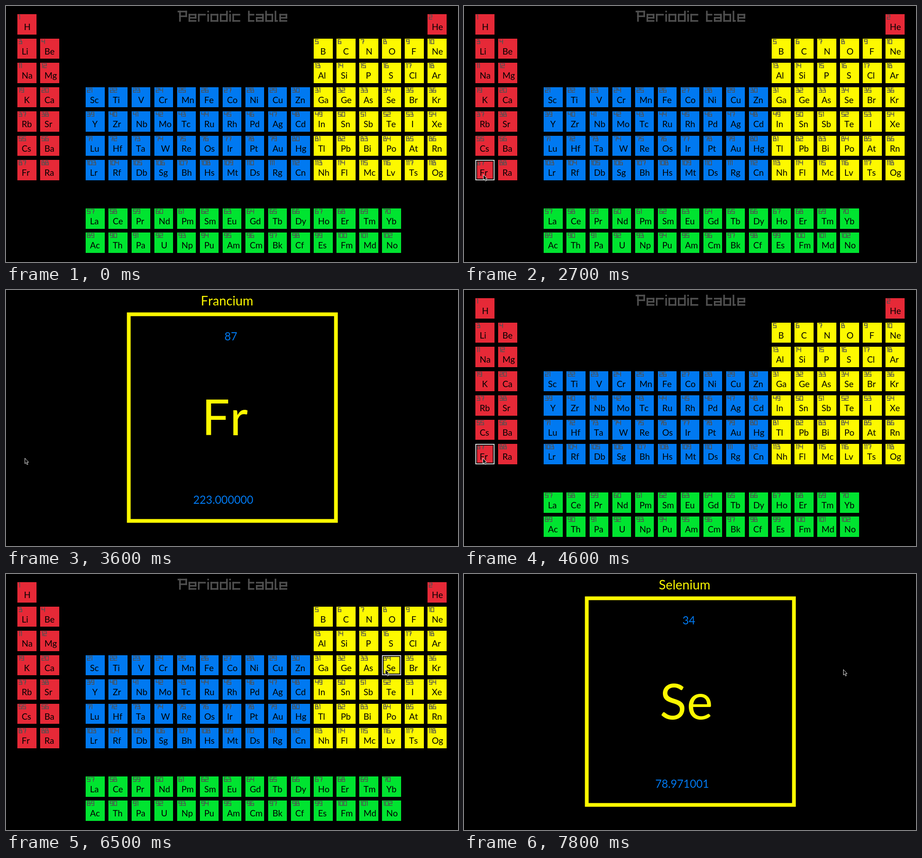
Write an HTML page with a canvas that moves like this. It is 993 by 564 pixels and loops after 8 s.

```html
<!DOCTYPE html>
<html lang="en">
<head>
<meta charset="utf-8">
<title>Periodic table</title>
<style>
html, body { margin: 0; width: 100%; height: 100%; overflow: hidden; background: #000; }
canvas { display: block; }
</style>
</head>
<body>
<canvas id="stage" width="993" height="564" role="img" aria-label="Periodic table"></canvas>
<script>
const ctx = document.getElementById('stage').getContext('2d');
const LOOP = 8000, STEP = 100;
const RED = '#e62937', BLUE = '#0079f1', GREEN = '#00e430', YELLOW = '#fdf900', GRAY = '#505050';

// Blocky letters: width in units, then strokes as column-row corner pairs.
const GLYPHS = {
  0: [5, '00 40 46 06 00'],
  1: [2, '00 10 16'],
  2: [5, '00 40 43 03 06 46'],
  3: [5, '00 30 33', '03 43 46 06'],
  4: [5, '00 03 43', '40 46'],
  5: [5, '40 00 03 43 46 06'],
  6: [5, '30 00 06 46 43 03'],
  7: [5, '00 40 43 33 36'],
  8: [5, '03 00 30 33', '03 43 46 06 03'],
  9: [5, '43 03 00 40 46 16'],
  P: [6, '00 50 53 13', '10 16'],
  e: [5, '04 44 42 02 06 46'],
  r: [5, '06 02 42'],
  i: [1, '00 00', '02 06'],
  o: [5, '02 42 46 06 02'],
  d: [5, '40 46 06 02 42'],
  c: [5, '42 02 06 46'],
  t: [4, '00 06 36', '02 32'],
  a: [5, '02 42 46 06 04 44'],
  b: [5, '00 06 46 42 02'],
  l: [2, '00 06 16'],
  ' ': [3]
};

function blockText(text, x, y, unit, gap) {
  ctx.fillStyle = GRAY;
  for (const ch of text) {
    const [width, ...strokes] = GLYPHS[ch];
    for (const stroke of strokes) {
      const pts = stroke.split(' ').map(p => [+p[0], +p[1]]);
      for (let i = 1; i < pts.length; i++) {
        const [ax, ay] = pts[i - 1], [bx, by] = pts[i];
        ctx.fillRect(x + Math.min(ax, bx) * unit, y + Math.min(ay, by) * unit,
          (Math.abs(ax - bx) + 1) * unit, (Math.abs(ay - by) + 1) * unit);
      }
    }
    x += width * unit + gap;
  }
}

function label(text, x, y, size, color) {
  ctx.font = size + 'px Lato, sans-serif';
  ctx.fontKerning = 'none';
  ctx.fillStyle = color;
  ctx.fillText(text, x, y);
}

// Runs of neighbouring elements: column, row, first number, symbols.
const RUNS = [
  [0, 0, 1, 'H'], [18, 0, 2, 'He'],
  [0, 1, 3, 'Li Be'], [13, 1, 5, 'B C N O F Ne'],
  [0, 2, 11, 'Na Mg'], [13, 2, 13, 'Al Si P S Cl Ar'],
  [0, 3, 19, 'K Ca'], [3, 3, 21, 'Sc Ti V Cr Mn Fe Co Ni Cu Zn Ga Ge As Se Br Kr'],
  [0, 4, 37, 'Rb Sr'], [3, 4, 39, 'Y Zr Nb Mo Tc Ru Rh Pd Ag Cd In Sn Sb Te I Xe'],
  [0, 5, 55, 'Cs Ba'], [3, 5, 71, 'Lu Hf Ta W Re Os Ir Pt Au Hg Tl Pb Bi Po At Rn'],
  [0, 6, 87, 'Fr Ra'], [3, 6, 103, 'Lr Rf Db Sg Bh Hs Mt Ds Rg Cn Nh Fl Mc Lv Ts Og'],
  [3, 8, 57, 'La Ce Pr Nd Pm Sm Eu Gd Tb Dy Ho Er Tm Yb'],
  [3, 9, 89, 'Ac Th Pa U Np Pu Am Cm Bk Cf Es Fm Md No']
];

function cellColor(col, row) {
  if (row > 7) return GREEN;
  if (col < 2 || row === 0) return RED;
  return col < 13 ? BLUE : YELLOW;
}

const cells = RUNS.flatMap(([col, row, first, symbols]) =>
  symbols.split(' ').map((symbol, i) => {
    const left = 25.2 + 50.06 * (col + i), top = 18.4 + 53.45 * row;
    const x = Math.round(left), y = Math.round(top);
    return {
      symbol, x, y, number: String(first + i), color: cellColor(col + i, row),
      w: Math.round(left + 41.6) - x, h: Math.round(top + 44.6) - y
    };
  }));

function frame(x, y, w, h, line, color) {
  ctx.strokeStyle = color;
  ctx.lineWidth = line;
  ctx.strokeRect(x + line / 2, y + line / 2, w - line, h - line);
}

function drawCell(c, hover) {
  ctx.fillStyle = c.color;
  ctx.fillRect(c.x, c.y, c.w, c.h);
  blockText(c.number, c.x + 3, c.y + 1.2, 1.5, 1);
  label(c.symbol, c.x + (c.symbol.length > 1 ? 9.4 : 14.6), c.y + 34.7, 19, '#000');
  if (hover) {
    frame(c.x, c.y, c.w, c.h, 3.6, '#000');
    frame(c.x, c.y, c.w, c.h, 1.7, '#f5f5f5');
  }
}

function drawTable(pointer) {
  blockText('Periodic table', 377, 10.5, 3.44, 3.44);
  for (const c of cells) {
    const hover = pointer && pointer.x >= c.x && pointer.x < c.x + c.w &&
      pointer.y >= c.y && pointer.y < c.y + c.h;
    drawCell(c, hover);
  }
}

function drawDetail(name, number, symbol, mass, massX) {
  frame(265.6, 49.4, 463.3, 463.4, 8.2, YELLOW);
  label(name, 428, 34, 28.2, YELLOW);
  label(number, 479.9, 111, 24.2, BLUE);
  label(symbol, 430, 320.3, 109, YELLOW);
  label(mass, massX, 471, 24.2, BLUE);
}

// Pointer stops: time, x, y.
const PATH = [
  [900, 7, 40], [1200, 34, 31], [1300, 34, 31], [1600, 33, 79],
  [2200, 27, 197], [2400, 22, 262], [2700, 42, 371], [3300, 42, 371],
  [3400, 41, 370], [4900, 41, 370], [5800, 541, 350], [6500, 833, 210]
];

function pointerAt(t) {
  const hidden = t < 900 || (t >= 3400 && t < 3600) || (t >= 6700 && t < 7800);
  if (hidden) return null;
  const i = PATH.findIndex(p => p[0] > t);
  if (i < 0) return { x: 833, y: 210 };
  const [t0, x0, y0] = PATH[i - 1], [t1, x1, y1] = PATH[i];
  const k = (t - t0) / (t1 - t0);
  return { x: x0 + (x1 - x0) * k, y: y0 + (y1 - y0) * k };
}

const ARROW = new Path2D('M.5 .5V12.6L3.2 10.2L5.2 14.8L7.2 14L5.2 9.5H8.7Z');

function drawPointer({ x, y }) {
  ctx.save();
  ctx.translate(Math.round(x), Math.round(y));
  ctx.fillStyle = '#000';
  ctx.fill(ARROW);
  ctx.strokeStyle = '#e6e6e6';
  ctx.lineWidth = 1;
  ctx.stroke(ARROW);
  ctx.restore();
}

function draw(now) {
  const t = Math.floor((now % LOOP) / STEP) * STEP;
  const pointer = pointerAt(t);
  ctx.fillStyle = '#000';
  ctx.fillRect(0, 0, 993, 564);
  if (t >= 6700) drawDetail('Selenium', '34', 'Se', '78.971001', 420.3);
  else if (t >= 3400 && t < 4600) drawDetail('Francium', '87', 'Fr', '223.000000', 411.3);
  else drawTable(pointer);
  if (pointer) drawPointer(pointer);
}

let start;
function tick(now) {
  start ??= now;
  draw(now - start);
  requestAnimationFrame(tick);
}
draw(0);
requestAnimationFrame(tick);
</script>
</body>
</html>
```
